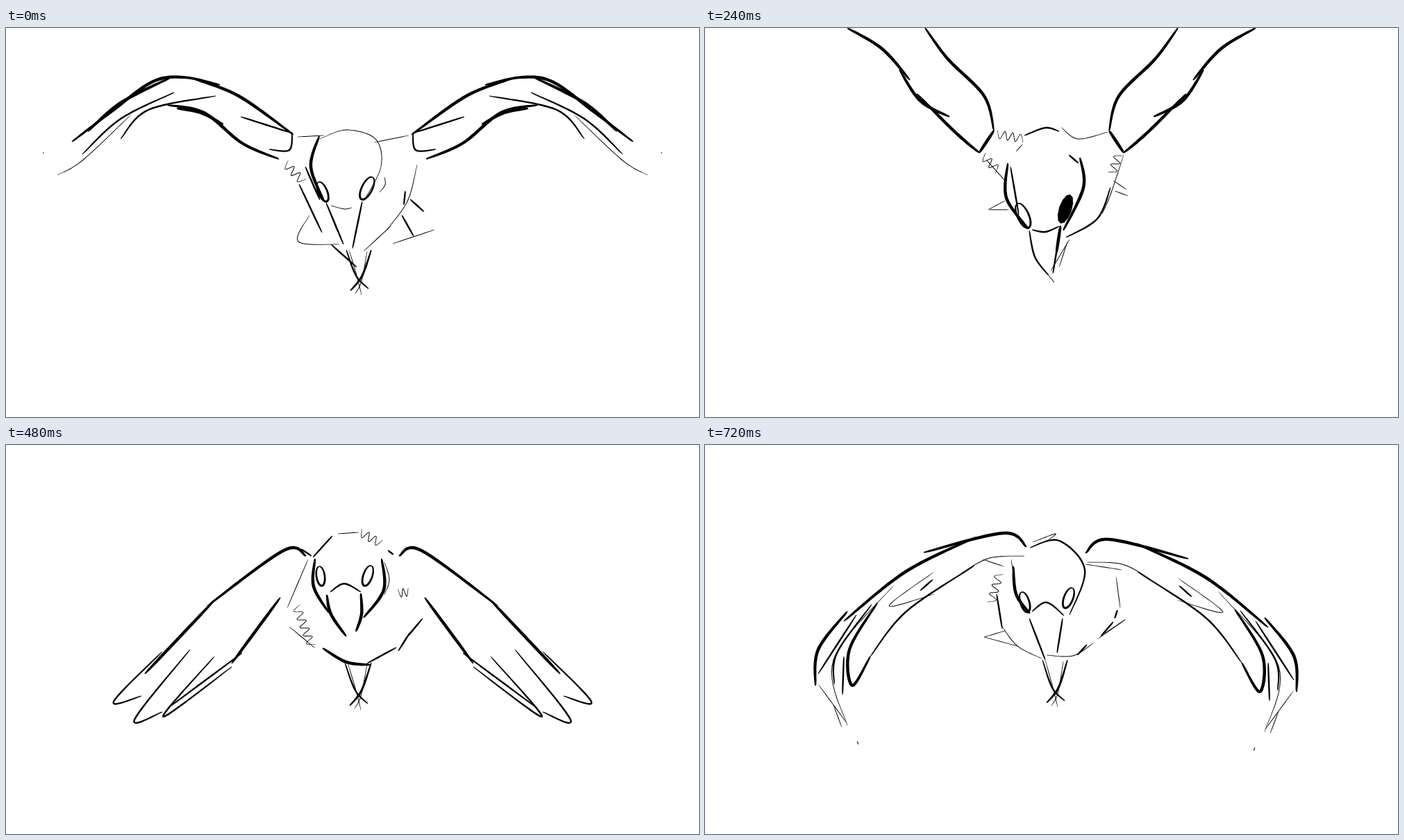
These frames come from a looping animation (998x561 px, 800 ms). An HTML page:

```html
<!DOCTYPE html>
<html lang="en">
<head>
<meta charset="utf-8">
<title>Flying bird</title>
<style>
  html, body { margin: 0; width: 100%; height: 100%; overflow: hidden; background: #fff; }
  svg { display: block; width: 998px; height: 561px; }
  .pose { visibility: hidden; animation: show 800ms step-end infinite; }
  @keyframes show {
    0% { visibility: visible; }
    10%, 100% { visibility: hidden; }
  }
</style>
</head>
<body>
<svg id="stage" viewBox="0 0 998 561"></svg>
<script>
// f, m, b: fine, medium and bold strokes; o, O: open and dark eye;
// z: scribble; t: crossed tail feathers.
const brush = { f: 1, m: 2.5, b: 4.5 };

// Smooth curve through the points.
function curve(p, steps = 12) {
  const out = [p[0]];
  for (let i = 0; i < p.length - 1; i++) {
    const a = p[i - 1] || p[i], b = p[i], c = p[i + 1], d = p[i + 2] || c;
    for (let k = 1; k <= steps; k++) {
      const t = k / steps;
      out.push([0, 1].map(j => b[j] + t / 2 * (c[j] - a[j] +
        t * (2 * a[j] - 5 * b[j] + 4 * c[j] - d[j] +
        t * (3 * (b[j] - c[j]) + d[j] - a[j])))));
    }
  }
  return out;
}

const shape = pts =>
  `<path d="M${pts.map(p => p.map(v => v.toFixed(1)).join(' ')).join('L')}Z"/>`;

// Brush outline, narrowing towards both ends.
function ink(width, pts) {
  const c = curve(pts), last = c.length - 1, near = [], far = [];
  c.forEach(([x, y], i) => {
    const a = c[Math.max(0, i - 1)], b = c[Math.min(last, i + 1)];
    const dx = b[0] - a[0], dy = b[1] - a[1], len = Math.hypot(dx, dy) || 1;
    const r = width / 2 * (.35 + .65 * Math.sqrt(Math.abs(Math.sin(Math.PI * i / last))));
    near.push([x - dy / len * r, y + dx / len * r]);
    far.unshift([x + dy / len * r, y - dx / len * r]);
  });
  return shape(near.concat(far));
}

function eye([[x1, y1], [x2, y2]], dark) {
  const ring = Array.from({ length: 13 }, (_, i) => {
    const a = i * Math.PI / 6, u = (1 - Math.cos(a)) / 2, v = Math.sin(a) * .21;
    return [x1 + (x2 - x1) * u - (y2 - y1) * v, y1 + (y2 - y1) * u + (x2 - x1) * v];
  });
  return dark ? shape(ring) : ink(3, ring);
}

function scribble([[x1, y1], [x2, y2]]) {
  const dx = x2 - x1, dy = y2 - y1, len = Math.hypot(dx, dy);
  const n = Math.max(4, Math.round(len / 6));
  return ink(1, Array.from({ length: n + 1 }, (_, i) => {
    const u = i / n, side = (i % 2 ? 6 : -6) / len;
    return [x1 + dx * u - dy * side, y1 + dy * u + dx * side];
  }));
}

function tail([[x1, y], [x2, end]]) {
  const mid = (x1 + x2) / 2, knot = end - 28;
  return ink(2.4, [[x1, y], [mid - 4, knot], [mid + 14, end - 9]]) +
    ink(3, [[x2, y], [mid + 5, knot], [mid - 12, end - 6]]) +
    ink(1, [[x1 + 4, y], [mid - 3, knot], [mid + 4, end]]) +
    ink(1, [[x2 - 6, y + 2], [mid + 4, knot + 8], [mid - 5, end - 2]]);
}

function stroke(text) {
  const [kind, ...n] = text.trim().split(' ');
  const pts = [];
  for (let i = 0; i < n.length; i += 2) pts.push([+n[i], +n[i + 1]]);
  if (brush[kind]) return ink(brush[kind], pts);
  if (kind === 'z') return scribble(pts);
  if (kind === 't') return tail(pts);
  return eye(pts, kind === 'O');
}

const sketch = text => text.split(',').map(stroke).join('');
const shift = (part, y) => `<g transform="translate(0 ${y})">${part}</g>`;
const pair = (wing, x = 998, y = 0) =>
  wing + `<g transform="translate(${x} ${y}) scale(-1 1)">${wing}</g>`;

// Wings level, tips trailing
const glideWing = sketch(`b 95 164 150 122 210 78 255 71 308 82,
  b 118 149 165 108 238 71, b 270 73 335 98 414 154,
  m 110 182 165 131 242 93, f 74 212 110 191 180 125,
  m 165 160 205 118 302 98, b 232 111 285 122 340 166 393 189,
  b 246 116 280 122 313 139, m 338 128 410 151,
  m 379 175 408 176 412 150, f 53 180 55 180`);
const glideHead = sketch(`f 452 160 490 147 532 160 540 200 515 250,
  b 451 156 439 200 458 250, m 431 200 452 248,
  o 450 222 462 250, o 528 215 512 247, f 545 215 546 226 538 237,
  m 461 252 486 312, m 513 250 499 318, f 468 256 487 261 498 259`);
const glideBody = sketch(`f 420 157 458 155, f 530 165 580 155,
  z 402 195 428 222, m 422 225 455 295, f 437 270 421 308 480 312,
  f 592 197 578 250 545 295, m 575 235 573 255, m 582 247 602 265,
  f 557 311 617 291, m 570 270 587 300, f 555 285 515 322,
  m 468 312 505 345, t 490 320 526 385`);

// Wings lifting
const liftWing = sketch(`b 117 0 210 10 310 9 356 40, m 122 5 230 9,
  f 356 40 367 64, m 367 64 385 106 417 139,
  f 118 5 102 17 140 35 205 32, m 112 13 205 22,
  b 112 26 205 32 270 45 325 90 360 160 405 184,
  m 330 78 352 152, m 403 154 406 142`);
const liftHead = sketch(`b 447 162 436 215 462 265, b 524 158 541 200 522 265,
  m 462 264 478 270 508 264, o 451 235 462 258, O 525 226 509 253,
  b 463 268 475 300 495 333, m 512 262 500 330, f 475 143 528 155`);
const liftBody = sketch(`m 413 147 425 155 440 153, f 438 160 480 143,
  z 403 188 426 212, m 428 220 438 260, f 436 260 416 296 466 297,
  m 434 297 470 298, m 440 262 465 295, m 440 278 420 293,
  z 537 157 592 140, f 590 175 583 225 575 262,
  f 580 240 608 278 577 290, f 575 262 540 297, f 510 301 605 283,
  m 499 333 512 360, f 535 295 508 335`);

const climbWing = sketch(`b 168 0 240 22 295 66, b 280 52 345 130,
  b 318 98 365 163 400 183, m 322 0 366 66 404 120 417 143`);

// Wings at the top
const peakWing = sketch(`b 205 0 255 30 295 75, b 280 60 310 105 352 128,
  b 305 95 360 150 395 180, b 317 0 350 45 402 98 416 148, b 416 148 395 180`);
const peakHead = sketch(`f 448 178 457 168, b 436 195 434 245 466 290,
  m 440 200 452 270, b 540 187 545 230 516 292, m 524 183 538 195,
  o 450 253 466 288, O 526 240 512 282, m 471 291 490 294 510 286,
  m 467 292 475 330 495 357, b 512 285 506 325, m 510 300 501 354,
  f 495 357 503 367`);
const peakBody = sketch(`z 420 153 459 160, m 460 155 490 144 510 149,
  z 400 184 422 206, f 405 190 432 220, f 408 262 432 249, f 408 262 438 262,
  f 513 143 537 160 580 150, z 596 182 586 210, f 603 183 584 240 572 268,
  m 584 230 565 275 520 302, f 588 220 607 233, f 590 235 609 242,
  f 525 305 498 350, f 522 308 510 345`);

const dropWing = sketch(`b 418 160 370 132 300 94, m 320 106 220 55 165 38,
  b 395 186 325 166 255 138, m 285 150 200 122,
  f 165 38 105 30 125 52, m 215 56 125 52, m 245 92 150 88,
  f 125 52 115 70 150 88, f 150 88 148 108 200 122`);

// Downstroke, tips bending up
const pressWing = sketch(`b 342 173 385 148 418 162, m 200 265 280 218 375 165,
  m 218 257 355 177, b 248 293 300 270 378 193,
  m 256 275 310 256 358 220, f 360 210 378 200 395 208, m 318 272 348 235`);
const pressTips = sketch(`f 143 161 147 178, m 147 172 157 230 183 270,
  m 181 190 198 245 252 267, f 174 190 188 268, f 190 178 208 243 240 262,
  m 208 180 226 246, f 126 170 115 215 133 270, f 115 253 150 292 242 293,
  b 215 260 250 265`);
const pressHead = sketch(`b 452 152 432 195 462 240, b 541 160 551 205 514 257,
  m 452 150 464 138, o 452 180 456 204, o 530 174 514 202,
  f 467 225 490 207 517 228, m 518 220 498 275, m 463 215 466 262,
  m 465 228 490 288`);
const pressBody = sketch(`z 478 134 520 134, m 418 158 448 157, m 543 147 572 150,
  z 398 210 422 245, f 408 250 440 250, m 418 250 432 272,
  b 430 278 465 311 520 317 560 302, m 565 297 595 238, f 585 250 606 180,
  f 600 195 625 198, t 486 320 528 394`);

const pushWing = sketch(`b 432 160 400 152 290 232, b 300 224 200 330,
  b 395 220 325 315, m 340 300 235 378, m 225 298 155 370 195 362,
  m 265 295 185 396 225 385, m 300 305 226 392 325 320`);

// Wings at the bottom
const lowWing = sketch(`b 433 160 405 157 335 215 258 332, m 268 326 234 390,
  m 268 322 230 412 242 420 265 395, m 312 310 262 395 247 448 300 425 372 330,
  m 305 318 270 380, b 395 232 376 280 352 340,
  m 380 265 360 375 295 435 320 400 365 325, m 395 230 412 214 425 212`);
const lowHead = sketch(`b 445 160 443 200 465 238, m 442 158 470 127,
  b 541 160 544 205 515 245, f 545 165 552 190 545 212,
  o 451 171 455 199, o 526 170 516 199, m 467 208 487 196 511 208,
  b 462 212 468 240 490 272, b 511 210 512 240 504 265`);
const lowBody = sketch(`f 478 128 508 126, z 510 126 540 142, m 425 150 440 160,
  f 435 165 405 235, z 418 232 440 290, f 408 262 445 293,
  b 456 293 490 313 524 317, m 520 315 562 292, m 565 297 582 270,
  m 575 280 600 250, m 550 152 558 158, z 565 214 580 212, t 488 314 526 382`);
const lowPlume = sketch(`m 612 240 648 300, f 615 245 662 365`);

// Wings rising
const riseWing = sketch(`b 434 146 325 185 235 265, m 434 146 438 162 428 177,
  b 430 176 315 232 247 320, b 238 257 182 345 187 412,
  b 240 258 198 375 214 430, f 214 430 232 429 238 418,
  m 270 257 235 350 238 420, b 247 315 242 380 260 426,
  m 260 426 292 310 360 222, m 395 201 355 225 318 265 335 262 357 225`);
const riseHead = sketch(`b 447 163 443 212 467 248, m 449 165 455 225,
  b 547 155 550 210 522 255, o 460 202 466 225, o 530 195 523 226,
  m 471 236 490 222 515 234, b 467 240 478 277 496 304, m 520 235 505 307`);
const riseBody = sketch(`f 438 160 470 127, z 392 206 412 240, z 410 255 432 272,
  m 423 250 455 292 495 315, f 440 275 470 300, z 482 130 528 130,
  f 530 135 545 153 565 157, m 607 225 585 270, f 600 232 612 248 592 255,
  m 563 288 588 272, f 495 305 545 292, f 540 300 556 288,
  t 494 314 523 372`);

// Wings spreading
const spreadWing = sketch(`b 463 147 430 127 315 155, b 390 133 290 182 200 254,
  b 205 240 163 295 159 347, m 218 245 163 330,
  b 248 228 208 295 212 347 238 305, m 238 305 290 240 388 174,
  f 370 184 410 163 460 160`);
const spreadTips = sketch(`f 272 202 185 310 205 405, m 240 230 190 300 186 345,
  f 163 345 205 402, m 200 305 198 360, f 185 375 197 407,
  f 330 183 265 232 330 215, m 310 210 328 194, f 219 427 221 432`);
const spreadHead = sketch(`b 444 175 448 215 468 243, f 441 165 450 225,
  m 468 148 510 138 547 180 525 245, o 456 212 465 241, o 529 206 518 235,
  m 471 240 492 227 517 246, m 467 250 490 310, m 515 250 507 300`);
const spreadBody = sketch(`f 472 140 505 128 490 140, f 400 165 430 175,
  z 424 185 412 228, m 420 215 428 265, f 428 262 450 290 485 308,
  f 402 277 432 268, f 402 277 450 290, f 492 303 530 304 560 285,
  m 536 303 550 288, f 548 172 600 180, f 592 190 598 235, m 594 238 590 250,
  m 588 255 570 276, f 565 280 605 252 575 272, t 486 310 522 378`);

const poses = [
  pair(glideWing) + glideHead + glideBody,
  pair(liftWing) + liftHead + liftBody,
  pair(climbWing) + shift(peakHead, -13) + liftBody,
  pair(peakWing) + peakHead + peakBody,
  pair(dropWing) + shift(pressHead, 16) + pressBody,
  pair(pressWing + pressTips) + pressHead + pressBody,
  pair(pushWing) + shift(lowHead, 4) + lowBody,
  pair(lowWing) + lowHead + lowBody + lowPlume,
  pair(riseWing) + riseHead + riseBody,
  pair(spreadWing + spreadTips, 1011, 9) + spreadHead + spreadBody
];

document.getElementById('stage').innerHTML = poses.map((art, i) =>
  `<g class="pose" style="animation-delay:${i && i * 80 - 800}ms">${art}</g>`).join('');
</script>
</body>
</html>
```
